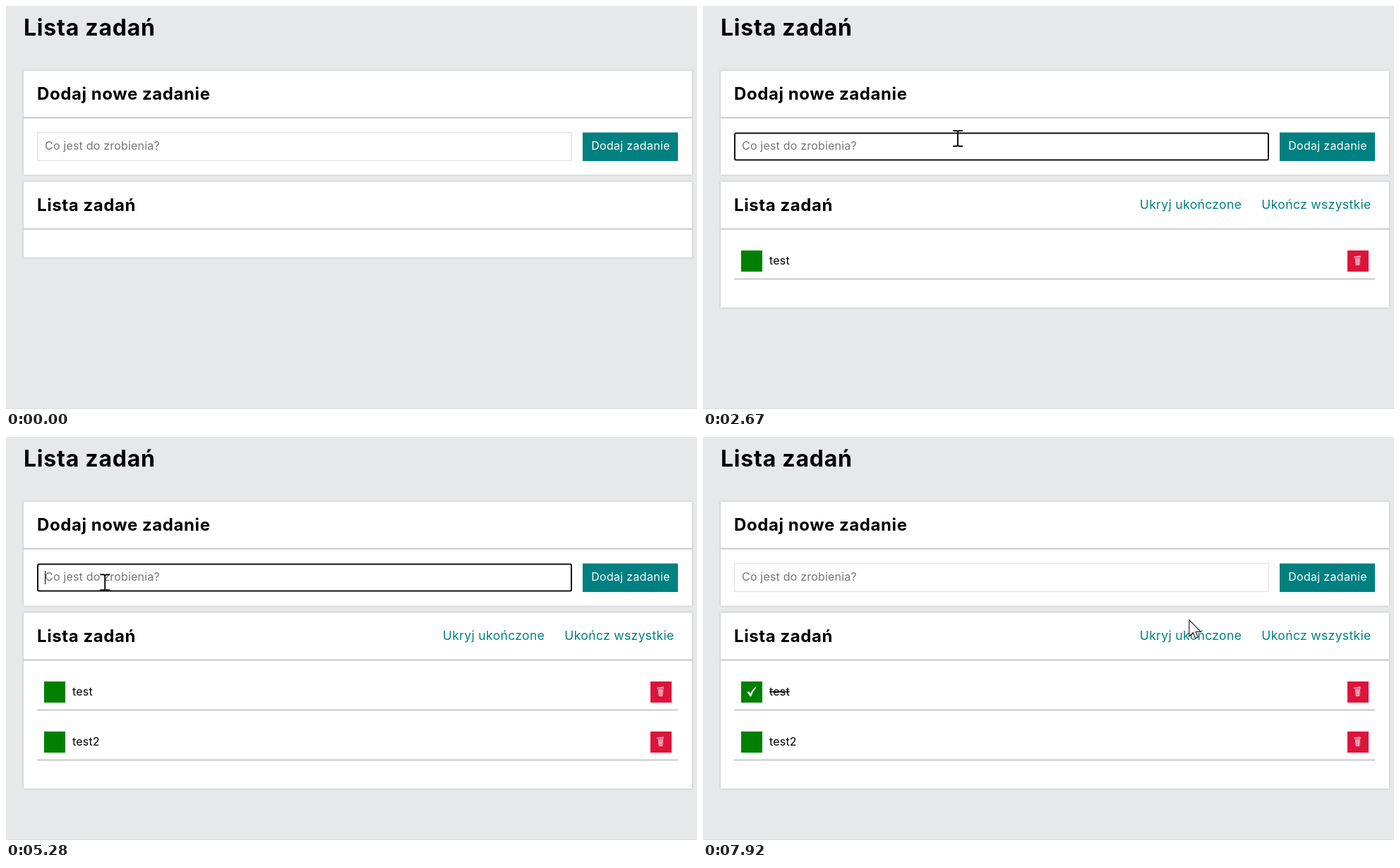
An HTML page that plays this animation: 979x572 px, repeating every 7.99 s.

```html
<!DOCTYPE html>
<html lang="pl">
<meta charset="utf-8">
<title>Lista zadań</title>
<style>
  html, body { margin: 0; width: 100%; height: 100%; overflow: hidden; background: #e6e8e9; }
  svg { display: block; width: 979px; height: 572px; }
  text { font: 400 16px Inter, "Open Sans", sans-serif; letter-spacing: .012em; font-optical-sizing: none; }
  .title { font-weight: 700; font-size: 24px; letter-spacing: .024em; }
  .main { font-size: 32px; }
  .link { font-size: 17.6px; letter-spacing: .018em; text-anchor: middle; fill: teal; }
  .panel { fill: #fff; filter: drop-shadow(0 0 1.5px #b4b4b4); }
  .rule { fill: #c8c8c8; }
  .done { text-decoration: line-through; }
</style>
<svg viewBox="0 0 979 572">
  <defs>
    <g id="row">
      <rect x="54" y="347" width="30" height="30" fill="green"/>
      <rect x="913" y="347" width="30" height="30" fill="#dc143c"/>
      <path d="M922.5 355.5L931.5 354.5V357.5H922.5Z M924 358.5H931L930.3 368H924.8Z" fill="#f8dce1"/>
      <path d="M925.8 359V367.5M927.6 359V367.5M929.4 359V367.5M923 356.5H931" stroke="#dc143c" stroke-width=".6"/>
      <rect class="rule" x="44" y="386.5" width="908" height="2"/>
    </g>
    <path id="tick" d="M62.5 362.5L65 361L67.2 364.2Q70 358 74.3 355L75.3 355.7Q70.5 361 68.3 368.3H66.5Q64.8 365 62.5 362.5Z" fill="#fff"/>
  </defs>
  <rect y="571" width="979" height="1" fill="#dcdedf"/>
  <text class="title main" x="25" y="42">Lista zadań</text>

  <rect class="panel" x="25" y="92" width="947" height="147.5"/>
  <rect class="rule" x="25" y="157.5" width="947" height="2"/>
  <text class="title" x="44" y="133">Dodaj nowe zadanie</text>
  <rect id="field" fill="#fff"/>
  <text id="entry" x="55" y="204"></text>
  <rect id="caret" y="190" width="1" height="19"/>
  <rect x="817" y="179.5" width="135" height="40.5" fill="teal"/>
  <text x="885" y="204" fill="#fff" text-anchor="middle" style="letter-spacing:.02em">Dodaj zadanie</text>

  <rect id="list" class="panel" x="25" y="249.5" width="947"/>
  <rect class="rule" x="25" y="315.5" width="947" height="2"/>
  <text class="title" x="44" y="291">Lista zadań</text>
  <g id="links">
    <text class="link" x="691" y="288">Ukryj ukończone</text>
    <text class="link" x="869" y="288" id="finish">Ukończ wszystkie</text>
  </g>
  <g id="task1">
    <use href="#row"/><use href="#tick" id="tick1"/>
    <text x="94" y="367" id="name1">test</text>
  </g>
  <g id="task2" transform="translate(0 71)">
    <use href="#row"/><use href="#tick" id="tick2"/>
    <text x="94" y="367" id="name2">test2</text>
  </g>

  <circle id="click" r="17.5" fill="#ff0" opacity=".5"/>
  <path id="arrow" d="M.5 .5V24L6 18.8L9.4 26.5L13 25L9.6 17.5H17Z" fill="#fff" stroke="#111" stroke-width="1.1"/>
  <path id="beam" d="M-7 -11H-2L0 -10L2 -11H7M-7 11H-2L0 10L2 11H7M0 -10V10" fill="none" stroke="#111" stroke-width="2"/>
</svg>
<script>
const LOOP = 7990, STEP = 68, BLINK = 530;
const $ = id => document.getElementById(id);
const show = (id, on) => $(id).setAttribute('visibility', on ? 'visible' : 'hidden');
const set = (id, attrs) => { for (const k in attrs) $(id).setAttribute(k, attrs[k]); };
const within = (t, a, b) => t >= a && t < b;

// Pointer moves: start time, number of steps, destination
const moves = [
  [70, 1, 860, 520], [137, 7, 375, 161], [600, 1, 366, 195], [930, 1, 361, 188],
  [4650, 3, 361, 4], [5000, 8, 38, 300], [5560, 4, 65, 364],
  [6250, 6, 75, 432], [7310, 10, 706, 254]
];
const clicks = [[740, 870], [5980, 6050], [6740, 6810], [7100, 7170]];
// Typed characters: time, resulting text
const keys = [
  [740, ''], [1590, 't'], [1700, 'te'], [1810, 'tes'], [1920, 'test'],
  [3330, 't'], [3430, 'te'], [3535, 'tes'], [3640, 'test'], [4110, 'test2']
];
const submits = [2670, 4250];

function pointer(t) {
  let x = 860, y = 520;
  for (const [start, n, tx, ty] of moves) {
    if (t < start) break;
    const p = Math.min(1, (Math.floor((t - start) / STEP) + 1) / n);
    const e = p * p * (3 - 2 * p);
    x += (tx - x) * e;
    y += (ty - y) * e;
  }
  return [x, y];
}

function drawField(t) {
  const focus = within(t, 740, 5980);
  const [keyTime, typed] = keys.findLast(k => k[0] <= t) || [0, ''];
  const sent = submits.some(s => s > keyTime && s <= t);
  const text = sent ? '' : typed;
  set('field', focus
    ? { x: 45, y: 180.5, width: 756, height: 38, rx: 2, stroke: '#101010', 'stroke-width': 2 }
    : { x: 44.5, y: 179.5, width: 757, height: 40, rx: 0, stroke: '#ddd', 'stroke-width': 1 });
  $('entry').textContent = text || 'Co jest do zrobienia?';
  set('entry', { fill: text ? '#111' : '#757575' });
  set('caret', { x: 55 + (text ? Math.round($('entry').getComputedTextLength()) : 0) });
  show('caret', focus && Math.floor((t - keyTime) / BLINK) % 2 === 0);
}

function drawList(t) {
  const count = submits.filter(s => s <= t).length;
  const done = [t >= 6050, within(t, 6810, 7170)];
  set('list', { height: 107.5 + 71 * count });
  show('links', count > 0);
  $('finish').style.fill = done[0] && done[1] ? '#b4b4b4' : '';
  done.forEach((on, i) => {
    const n = i + 1;
    show('task' + n, count >= n);
    show('tick' + n, on);
    $('name' + n).classList.toggle('done', on);
    if (count < n) show('name' + n, false); else show('name' + n, true);
  });
}

function drawPointer(t) {
  const [x, y] = pointer(t);
  const overField = x > 44 && x < 802 && y > 180 && y < 220;
  const place = { transform: `translate(${x.toFixed(1)} ${y.toFixed(1)})` };
  set('arrow', place);
  set('beam', place);
  show('arrow', t >= 70 && !overField);
  show('beam', t >= 70 && overField);
  set('click', { cx: x - (overField ? 2.5 : .5), cy: y - 1 });
  show('click', clicks.some(c => within(t, ...c)));
}

function frame() {
  const t = performance.now() % LOOP;
  drawField(t);
  drawList(t);
  drawPointer(t);
  requestAnimationFrame(frame);
}
frame();
</script>
</html>
```
